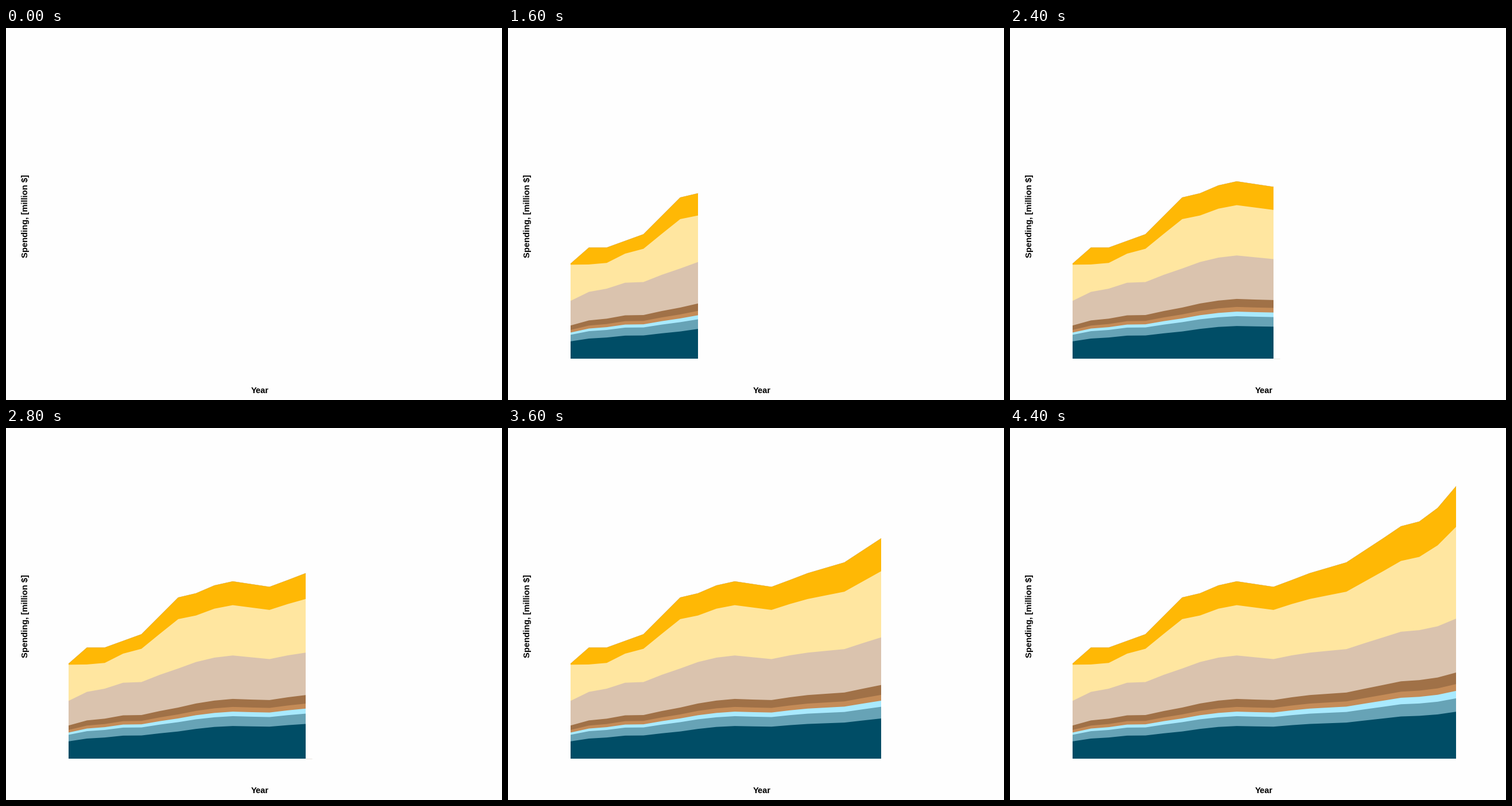
A matplotlib script for the animation above (4600 ms loop, 864x648 px).

```python
import matplotlib.pyplot as plt
import numpy as np
from matplotlib.animation import FuncAnimation

W, H, DPI = 864, 648, 100
STEP_MS, YEARS = 200, 22
BASE = 576

years = np.arange(YEARS)
# Whole pixels keep the stacked right edges crisp
x = np.round(108.7 + 31.82 * years)


def keyed(keys):
    """Straight lines through a few {year: value} points."""
    return np.interp(years, list(keys), list(keys.values()))


total = keyed({0: 165.5, 1: 193.5, 2: 193.5, 4: 216.7, 6: 280.7, 7: 288,
               8: 301.7, 9: 308.8, 11: 299.2, 13: 323, 15: 341.8,
               18: 404.7, 19: 413, 20: 436.7, 21: 474.5})

# Each band's top is a share of the height of the band above it
BANDS = [
    ("#ffb805", {0: 1}),
    ("#ffe6a0", {0: 0.989, 1: 0.848, 2: 0.862, 3: 0.892, 6: 0.866,
                 12: 0.866, 15: 0.851}),
    ("#dac3ae", {0: 0.615, 1: 0.709, 2: 0.731, 3: 0.723, 6: 0.646, 7: 0.675,
                 12: 0.668, 16: 0.652, 19: 0.637, 21: 0.604}),
    ("#a07147", {0: 0.574, 6: 0.567, 10: 0.583, 13: 0.6, 21: 0.615}),
    ("#c48b57", {0: 0.866}),
    ("#a9eaff", {0: 0.909}),
    ("#67a3b6", {0: 0.914, 21: 0.89}),
    ("#004d66", {0: 0.726, 3: 0.742, 6: 0.745, 8: 0.767, 21: 0.778}),
]
heights = total * np.cumprod([keyed(share) for _, share in BANDS], axis=0)
tops = BASE - heights

fig = plt.figure(figsize=(W / DPI, H / DPI), dpi=DPI, facecolor="#fefefe")
ax = fig.add_axes([0, 0, 1, 1])
ax.set(xlim=(0, W), ylim=(H, 0))
ax.axis("off")

label = dict(family="Liberation Sans", weight="bold", size=14.7 * 72 / DPI,
             ha="center", va="baseline", rotation_mode="anchor")
ax.text(442.5, 635.5, "Year", **label)
ax.text(37.8, 328, "Spending, [million $]", rotation=90, **label)

# Each band reaches down to the base and is covered by the ones below it
areas = [ax.fill([], [], color=color, lw=0)[0] for color, _ in BANDS]
outline, = ax.plot([], [], color="#d9a026", lw=0.35)
tail, = ax.plot([], [], color="#e4dfd8", lw=0.6, solid_capstyle="butt")


def draw(frame):
    n = frame if frame > 1 else 0
    for area, top in zip(areas, tops):
        area.set_visible(n > 0)
        if n:
            edge = np.column_stack([x[:n], top[:n]])
            area.set_xy(np.vstack([edge, [x[n - 1], BASE], [x[0], BASE]]))
    outline.set_data(x[:n], tops[0, :n])
    # A short stub of the baseline shows in three steps out of seven
    if n and n % 7 in (5, 6, 0):
        tail.set_data([x[n - 1], x[n - 1] + 10.5], [BASE, BASE])
    else:
        tail.set_data([], [])
    return [*areas, outline, tail]


anim = FuncAnimation(fig, draw, frames=YEARS + 1, interval=STEP_MS,
                     repeat=True, repeat_delay=0)
plt.show()
```
